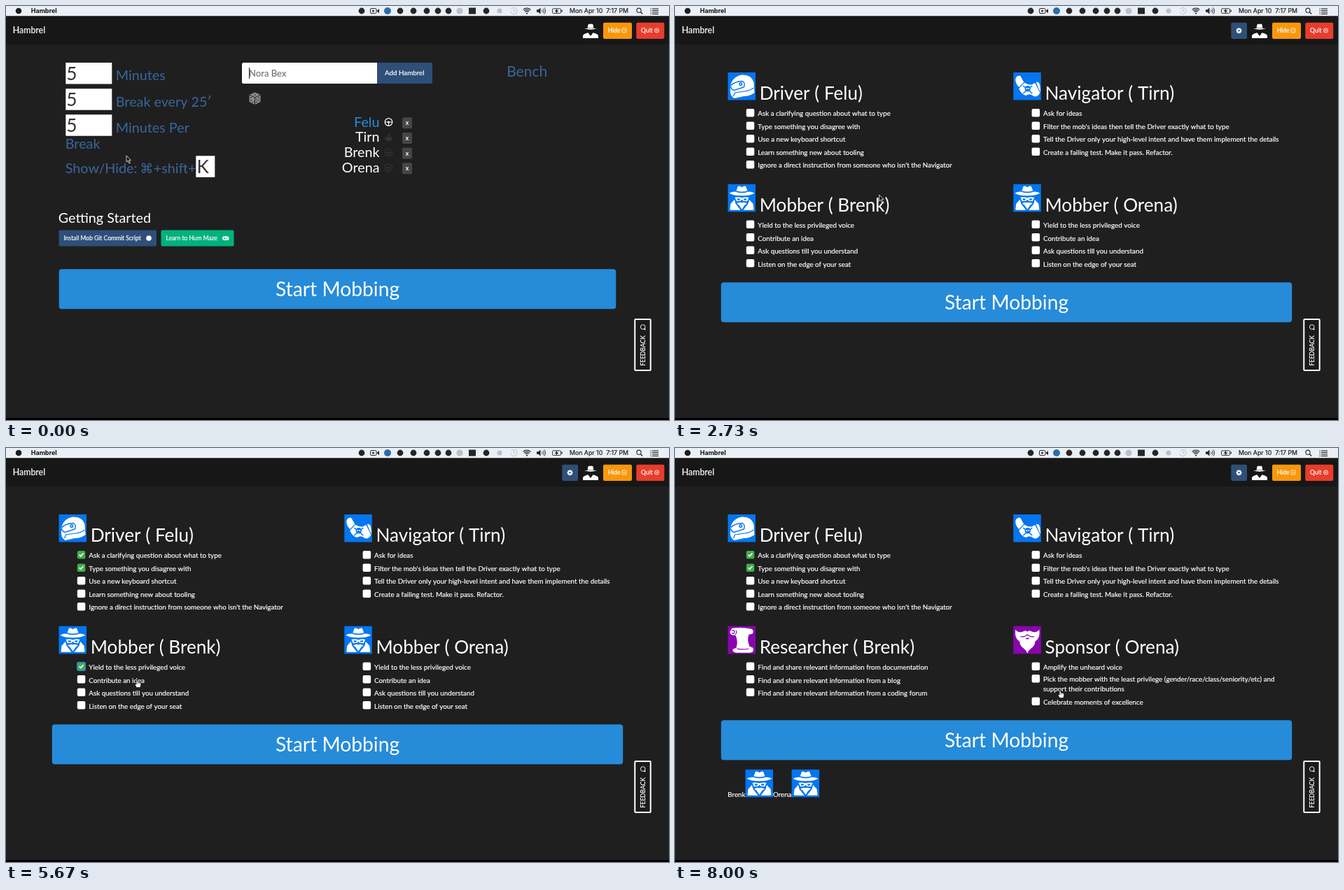
Recreate the animation shown at these times as an HTML page with a canvas. Size 947 by 592 pixels, loop 9.13 s.

```html
<!DOCTYPE html>
<html lang="en">
<head>
<meta charset="utf-8">
<title>Hambrel</title>
<style>
html, body { margin: 0; width: 100%; height: 100%; overflow: hidden; background: #1f1f1f; }
canvas { display: block; width: 947px; height: 592px; }
</style>
</head>
<body>
<canvas id="stage"></canvas>
<script>
const W = 947, H = 592, LOOP = 9130, STEP = 200 / 3;
const BG = '#1f1f1f', NAVY = '#2e4f78', LINK = '#3a669e', SKY = '#268bd9', BLUE = '#0476f0', PURPLE = '#8a05af';
const BODY = 9.8, SMALL = 8.5, MID = 19.75, BIG = 26.15;
const NAMES = ['Felu', 'Tirn', 'Brenk', 'Orena'];
const canvas = document.getElementById('stage');
const g = canvas.getContext('2d');
const ratio = window.devicePixelRatio || 1;
canvas.width = W * ratio;
canvas.height = H * ratio;

// ---- helpers ----
function box(x, y, w, h, color, r = 0) {
  g.fillStyle = color;
  g.beginPath();
  g.roundRect(x, y, w, h, r);
  g.fill();
}
function frame(x, y, w, h, color, width = 1, r = 0) {
  g.strokeStyle = color;
  g.lineWidth = width;
  g.beginPath();
  g.roundRect(x, y, w, h, r);
  g.stroke();
}
function disc(x, y, r, color) {
  g.fillStyle = color;
  g.beginPath();
  g.arc(x, y, r, 0, 7);
  g.fill();
}
function arc(x, y, r, color, width = 1, from = 0, to = Math.PI * 2) {
  g.strokeStyle = color;
  g.lineWidth = width;
  g.beginPath();
  g.arc(x, y, r, from, to);
  g.stroke();
}
const shape = (d, color) => { g.fillStyle = color; g.fill(new Path2D(d)); };
function line(d, color, width = 1) {
  g.strokeStyle = color;
  g.lineWidth = width;
  g.stroke(new Path2D(d));
}
function text(s, x, y, size, color = '#fff', align = 'left', font = 'Lato, sans-serif', weight = 400) {
  g.font = `${weight} ${size}px ${font}`;
  g.textAlign = align;
  g.fillStyle = color;
  g.fillText(s, x, y);
  if (size < 14 && weight === 400) {
    g.strokeStyle = color;
    g.lineWidth = 0.2;
    g.strokeText(s, x, y);
  }
}
function at(x, y, draw) {
  g.save();
  g.translate(x, y);
  draw();
  g.restore();
}

// ---- menu bar and header ----
function menuBar() {
  const ink = '#262626', pale = '#bcc1c8', sys = 'Inter, sans-serif';
  box(0, 0, W, 14.4, '#ebeff6');
  disc(18, 7, 4.3, '#1c1c1c');
  text('Hambrel', 35.7, 10.4, 9, '#111', 'left', sys, 700);
  for (const x of [508, 563, 582, 601, 617, 632, 686]) disc(x, 7, 4.4, ink);
  disc(545, 7, 5, '#2a6da8');
  disc(648, 7, 4.6, pale);
  box(661, 2.5, 10, 9, ink);
  disc(705, 7, 3.6, pale);
  frame(520.5, 3.5, 8.5, 7, ink, 1, 1.5);
  shape('M529.5 7L533 4V10.2Z', ink);
  disc(524.5, 7, 1.5, ink);
  arc(725.5, 7, 4.6, pale, 1, -2.6, 3);
  line('M725.5 4V7.3H728', pale);
  disc(744, 10.6, 1.1, ink);
  for (const r of [3.2, 5.4, 7.6]) arc(744, 10.8, r, ink, 1.2, -2.36, -0.78);
  shape('M758 5.2H760.3L763.5 2.6V11.4L760.3 8.8H758Z', ink);
  for (const r of [2.2, 4.4, 6.6]) arc(764, 7, r, ink, 0.9, -0.8, 0.8);
  frame(780.5, 3.8, 12, 6.6, ink, 0.9, 1);
  box(793.5, 5.6, 1.3, 3, ink);
  shape('M787.4 3.2L783.6 7.7H786L785.3 11L789.4 6.4H787Z', ink);
  text('Mon Apr 10  7:17 PM', 889, 10.3, 8.8, '#1a1a1a', 'right', sys);
  arc(904, 6.2, 3.1, ink, 1.1);
  line('M906.3 8.5L909.3 11.5', ink, 1.3);
  for (let y = 3.4; y < 12; y += 2.5) {
    box(920.5, y, 1.4, 1.1, ink);
    box(923, y, 9, 1.1, ink);
  }
}
function gear(x, y) {
  for (let i = 0; i < 8; i++) at(x, y, () => {
    g.rotate(i * Math.PI / 4);
    box(-0.9, -4, 1.8, 3, '#fff');
  });
  disc(x, y, 3, '#fff');
  disc(x, y, 1.2, NAVY);
}
function header(withGear) {
  box(0, 14.4, W, 40.6, '#171717');
  text('Hambrel', 9.8, 39.2, 12.4);
  if (withGear) {
    box(794.3, 23.7, 22.7, 23.2, NAVY, 2);
    gear(805.5, 35.3);
  }
  shape('M830.5 31.5L831.5 26.5Q833.5 25 835 26Q836.5 25 838.5 26.5L839.5 31.5Z', '#fff');
  shape('M826 32.3Q835 31.2 844 32.3Q835 35 826 32.3Z', '#fff');
  shape('M824 46V42.3Q825 39.8 831.5 38.3L835 43L838.5 38.3Q845 39.8 846 42.3V46Z', '#fff');
  box(853, 23.7, 41, 23.2, '#f7970d', 2);
  text('Hide', 859.7, 38.2, SMALL);
  frame(880, 32, 6, 6, '#fff', 0.8, 1);
  box(881.5, 34.6, 3, 0.9, '#fff');
  box(900.3, 23.7, 40, 23.2, '#e73d2c', 2);
  text('Quit', 907, 38.2, SMALL);
  arc(929.5, 35, 3, '#fff', 0.9);
  line('M928.3 33.8L930.7 36.2M930.7 33.8L928.3 36.2', '#fff', 0.9);
}
function feedback() {
  box(898, 447.5, 23, 73.5, '#1b1b1b', 1);
  frame(898.3, 448, 22.4, 73, '#fff', 2, 1);
  at(912.6, 514.5, () => {
    g.rotate(-Math.PI / 2);
    text('FEEDBACK', 0, 0, SMALL);
  });
  arc(909.7, 459, 3.3, '#fff', 0.9);
  line('M911 462L913.2 463L912.6 460.6', '#fff', 0.9);
}
function startButton(x, y, w) {
  box(x, y, w, 57, SKY, 4);
  text('Start Mobbing', W / 2, y + 38.3, 28.25, '#fff', 'center');
}

// ---- setup page ----
function wheel(x, y, color) {
  arc(x, y, 5.3, color, 1.2);
  disc(x, y, 1.5, color);
  line(`M${x - 5} ${y}H${x + 5}M${x} ${y}V${y + 5}`, color, 1);
}
function die() {
  shape('M355.5 123.5L363.5 127V137L355.5 141L347.5 137V127Z', '#8c8c8c');
  line('M347.5 127L355.5 131L363.5 127M355.5 131V141', BG, 1);
  for (const [x, y] of [[355.5, 127.2], [350, 131], [353, 137], [350, 135.2], [358, 133.5], [361, 135], [358, 137.2], [361, 131.2]])
    disc(x, y, 0.9, '#333');
}
function setupPage(t) {
  header(false);
  [81, 118.3, 155.3].forEach((y, i) => {
    box(85.3, y, 66, 30.5, '#fff');
    text('5', 86.3, y + 25, BIG, '#333');
    text(['Minutes', 'Break every 25′', 'Minutes Per'][i], 156.8, y + 25.2, MID, LINK);
  });
  text('Break', 84.8, 204.3, MID, LINK);
  text('Show/Hide:', 84.8, 239.2, MID, LINK);
  text('⌘', 191.5, 239.2, 19, LINK, 'left', '"DejaVu Sans", sans-serif');
  text('+shift+', 271.5, 239.2, MID, LINK, 'right');
  box(271.3, 214.3, 27, 30.5, '#fff');
  text('K', 272.6, 239.3, BIG, '#333');

  box(337, 81, 193, 30, '#fff', [2.5, 0, 0, 2.5]);
  text('Nora Bex', 347, 101.3, 13.1, '#777');
  if (t < 130 || (t >= 630 && t < 730)) box(347, 88, 1, 16, '#222');
  box(530, 81, 79, 30, NAVY, [0, 2.5, 2.5, 0]);
  text('Add Hambrel', 569.3, 99.2, BODY, '#fff', 'center');
  die();
  text('Bench', 715.2, 100.6, 21, LINK);

  NAMES.forEach((name, i) => {
    const y = 166 + i * 21.7, dim = '#343434';
    text(name, 533.5, y + 6.6, MID, i ? '#fff' : SKY, 'right');
    if (i === 1) shape(`M541 ${y}H552L550 ${y + 5}H543ZM544 ${y - 2}H550V${y - 1}H544ZM546 ${y - 5}H548V${y - 2}H546Z`, dim);
    else wheel(546.5, y, i ? dim : '#fff');
    box(566, y - 6.8, 14, 16, '#464646', 2);
    text('x', 573, y + 4.3, SMALL, '#fff', 'center', 'Lato, sans-serif', 700);
  });

  text('Getting Started', 74.8, 309.7, MID);
  box(75.5, 320.5, 139.5, 23, NAVY, 2);
  text('Install Mob Git Commit Script', 82.4, 334.7, SMALL);
  disc(204, 332, 3.8, '#fff');
  const green = t < 670 ? '#00b27c' : t < 870 ? '#008a66' : '#0a6a53';
  if (t < 870) box(221.5, 320.5, 104, 23, green, 2);
  else box(222.5, 321, 102, 21.5, green, 1);
  text('Learn to Hum Maze', 228.6, 334.7, SMALL);
  box(309, 329.3, 9.6, 5.6, '#fff', 2.8);
  box(310.7, 331.7, 2.8, 0.9, green);
  box(311.65, 330.75, 0.9, 2.8, green);
  disc(315.2, 332.8, 0.7, green);
  disc(316.6, 331.2, 0.7, green);
  startButton(75.7, 376.2, 795.6);
}

// ---- role icons, 40 x 40 ----
const ICONS = {
  helmet() {
    shape('M3.5 20Q6 6 20 3.5Q34 3 37 14L38 29Q32 34 23 34L9 37Q4 34 3.5 28Z', '#fff');
    line('M4 19Q9 13 21 12.5Q25 15 23 21L9 25.5Q5 25 4 20', BLUE, 1.4);
    line('M8 34L10 29L24 27Q32 26 37 22', BLUE, 1.2);
    arc(18.3, 16.5, 1.8, BLUE, 1.5);
  },
  map() {
    shape('M3 10Q4 4 10 5L15 14L8 21Q3 16 3 10Z', '#fff');
    shape('M8 23L16 14.5Q20 18 26 17.5L31 15L38 29Q35 36 29 34Q24 29 18 33Q11 31 8 23Z', '#fff');
    shape('M32.5 14Q37 13 38 19L39 28L36.5 24Z', '#fff');
    line('M14 19L27 30M27 19L14 30', BLUE, 1.6);
    disc(20.5, 23.3, 4.2, BLUE);
    disc(19, 23, 1.1, '#fff');
    disc(22, 23, 1.1, '#fff');
  },
  spy() {
    shape('M12 9.5L14.5 3Q17 2 20 4.5Q23 2 25.5 3L28 9.5Q20 12 12 9.5Z', '#fff');
    shape('M2 13Q6 10.5 11.5 11Q20 14 28.5 11Q34 10.5 38 13Q32 16.5 20 16.5Q8 16.5 2 13Z', '#fff');
    shape('M10 19Q15 18 20 19.5Q25 18 30 19L27.5 24.5L22 24L20 22L18 24L12.5 24.5Z', '#fff');
    shape('M12.5 27.5Q17 25 20 26.5Q23 25 27.5 27.5L24 30L20 36L16 30Z', '#fff');
    shape('M13 20.3L18 21L16.5 23H14ZM27 20.3L22 21L23.5 23H26Z', BLUE);
    shape('M3 36L4 28L9.5 22L11 28L18 37H4ZM37 36L36 28L30.5 22L29 28L22 37H36Z', '#fff');
  },
  scroll() {
    shape('M6 3Q20 1 34 4Q38 7 35 11L30 12Q27 20 31 29L36 31Q38 37 32 38H12Q6 37 7 33L12 31Q15 22 11 13Q3 14 3 8Z', '#fff');
    arc(7.3, 8.3, 2.2, PURPLE, 1.1, -2.5, 2.4);
    line('M10 12Q14 10 11.5 6M13 32Q17 34 30 32.5', PURPLE, 1.1);
  },
  beard() {
    shape('M3 5Q7 10 13 8Q18 5 20 8Q22 5 27 8Q33 10 37 5Q39 17 31 22Q31 28 25 32Q22 34 20 39Q18 34 15 32Q9 28 9 22Q1 17 3 5Z', '#fff');
    line('M10 15Q17 16 20 12Q23 16 30 15', PURPLE, 1.1);
    shape('M17 17.5Q20 16 23 17.5Q20 20 17 17.5Z', PURPLE);
  }
};
function icon(kind, x, y) {
  box(x, y, 39.5, 39.5, kind === 'scroll' || kind === 'beard' ? PURPLE : BLUE);
  at(x, y, ICONS[kind]);
}

// ---- roles page ----
const MOBBER = ['Yield to the less privileged voice', 'Contribute an idea', 'Ask questions till you understand', 'Listen on the edge of your seat'];
const ROLES = {
  driver: ['Driver', 'helmet', ['Ask a clarifying question about what to type', 'Type something you disagree with', 'Use a new keyboard shortcut',
    'Learn something new about tooling', "Ignore a direct instruction from someone who isn't the Navigator"]],
  navigator: ['Navigator', 'map', ['Ask for ideas', "Filter the mob's ideas then tell the Driver exactly what to type",
    'Tell the Driver only your high-level intent and have them implement the details', 'Create a failing test. Make it pass. Refactor.']],
  mobber: ['Mobber', 'spy', MOBBER],
  researcher: ['Researcher', 'scroll', ['documentation', 'a blog', 'a coding forum'].map(s => 'Find and share relevant information from ' + s)],
  sponsor: ['Sponsor', 'beard', ['Amplify the unheard voice',
    'Pick the mobber with the least privilege (gender/race/class/seniority/etc) and\nsupport their contributions', 'Celebrate moments of excellence']]
};
const CLICKS = [[3470, 'driver0'], [4470, 'driver1'], [5470, 'third0'], [5800, 'third1'], [6070, 'third2'], [7470, 'fourth0'], [7600, 'fourth1'], [7930, 'fourth2']];
const THIRD_UP = 6130, FOURTH_UP = 8000;

function checkbox(x, y, checked, focus) {
  box(x, y, 11.5, 11.5, checked ? '#3fae49' : '#fff', 2);
  if (focus) frame(x, y, 11.5, 11.5, '#3a7fc0', 1.6, 2);
  if (checked) line(`M${x + 2.8} ${y + 5.7}L${x + 4.9} ${y + 7.8}L${x + 8.7} ${y + 3.6}`, '#fff', 1.7);
}
function card(x, y, id, roleId, name, done, focus) {
  const [title, kind, goals] = ROLES[roleId];
  icon(kind, x, y);
  text(`${title} ( ${name})`, x + 45.2, y + 39, BIG);
  let row = y + 51.9;
  goals.forEach((goal, i) => {
    const lines = goal.split('\n'), key = id + i;
    if (lines.length > 1) row -= 1.2;
    checkbox(x + 26.3, row, done.has(key), focus === key);
    lines.forEach((s, n) => text(s, x + 42.8, row + 10.4 + n * 13.8, BODY));
    row += lines.length > 1 ? 32.6 : 18.5;
  });
}
function rolesPage(t) {
  const up3 = t >= THIRD_UP, up4 = t >= FOURTH_UP;
  const hits = CLICKS.filter(c => c[0] <= t).map(c => c[1])
    .filter(k => !(up3 && k.startsWith('third')) && !(up4 && k.startsWith('fourth')));
  const done = new Set(hits);
  const cleared = up4 || (up3 && t < 7470);
  const focus = cleared ? '' : hits[hits.length - 1];
  header(true);
  card(75.5, 95, 'driver', 'driver', NAMES[0], done, focus);
  card(483.3, 95, 'navigator', 'navigator', NAMES[1], done, focus);
  card(75.5, 254.7, 'third', up3 ? 'researcher' : 'mobber', NAMES[2], done, focus);
  card(483.3, 254.7, 'fourth', up4 ? 'sponsor' : 'mobber', NAMES[3], done, focus);
  const y = up4 ? 389.3 : 395.2;
  startButton(65.8, y, 815.4);
  let x = 75.3;
  for (const name of [up3 && NAMES[2], up4 && NAMES[3]]) if (name) {
    text(name, x, y + 109.7, BODY);
    x += g.measureText(name).width;
    icon('spy', x, y + 70.5);
    x += 39.5;
  }
}

// ---- pointer: move from start to end time, reaching x, y ----
const MOVES = [[0, 0, 172, 214], [200, 730, 298, 328], [2600, 2930, 279.5, 159], [3530, 3930, 256, 173], [4930, 5200, 208, 308],
  [5470, 5670, 187, 331], [5730, 5930, 193, 350], [6870, 7400, 550, 308], [7470, 7530, 550, 327], [7670, 7800, 550, 346]];
function pointer(t) {
  let i = MOVES.length - 1;
  while (i && MOVES[i][0] > t) i--;
  const [from, to, x1, y1] = MOVES[i];
  const [, , x0, y0] = MOVES[Math.max(0, i - 1)];
  const p = to > from ? Math.min(1, (t - from) / (to - from)) : 1;
  const e = p * p * (3 - 2 * p);
  const far = Math.hypot(x1 - x0, y1 - y0) > 40;
  const hand = i > 1 && (p === 1 || !far || (i > 2 && e < 0.04));
  at(x0 + (x1 - x0) * e, y0 + (y1 - y0) * e, () => {
    const d = hand
      ? 'M-1 .8Q0 -.3 1 .8V4Q2 3.4 3 4.2Q4 3.8 4.6 4.9Q5.8 4.9 5.7 6.2V8.4L4.6 11.5H-.6L-2.8 7.6Q-3 6 -1 7Z'
      : 'M0 0V9L2.1 7.1L3.8 11L5.4 10.3L3.7 6.6H6.4Z';
    g.lineJoin = 'round';
    shape(d, hand ? '#fff' : '#111');
    line(d, hand ? '#111' : '#f2f2f2', 0.8);
    if (hand) line('M1 5V7M3 5.4V7', '#222', 0.6);
    g.lineJoin = 'miter';
  });
}

function draw(ms) {
  const t = Math.round(Math.floor((ms + 4) / STEP) * STEP / 10) * 10;
  g.setTransform(ratio, 0, 0, ratio, 0, 0);
  box(0, 0, W, H, BG);
  menuBar();
  if (t < 930) setupPage(t);
  else rolesPage(t);
  feedback();
  box(0, 589.3, W, 3, '#000');
  pointer(t);
}
const origin = performance.now();
function tick() {
  draw((performance.now() - origin) % LOOP);
  requestAnimationFrame(tick);
}
tick();
</script>
</body>
</html>
```
